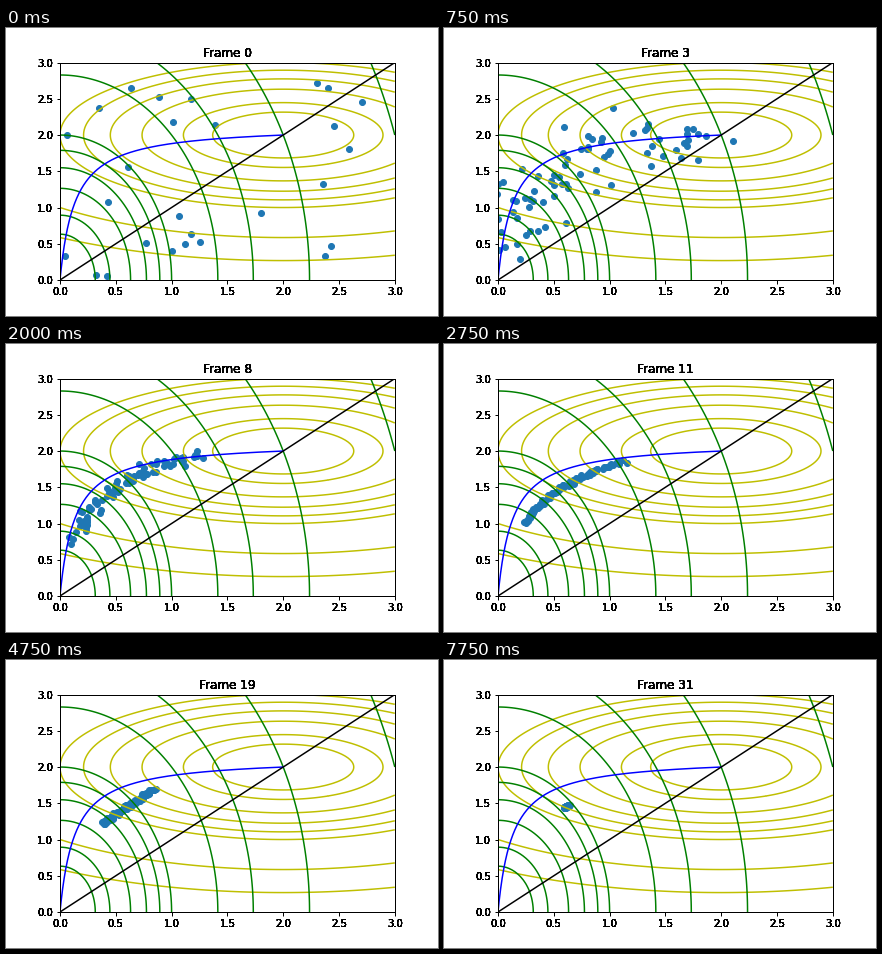
These frames come from a looping animation (432 px wide and 288 px high, 8000 ms). A matplotlib script:

```python
import numpy as np
import matplotlib.pyplot as plt
from matplotlib.animation import FuncAnimation

FRAMES, INTERVAL = 32, 250
SIZE = 80          # individuals in the population
TEXT_LAYERS = 12   # stacked copies give the hard, dark text edges

plt.rcParams.update({"font.family": "DejaVu Sans", "font.size": 10,
                     "axes.linewidth": 1, "xtick.major.width": 1,
                     "ytick.major.width": 1})

# The population scatters around a quadratic Bezier that shrinks with time.
# Each key: generation, scatter, then start, control and end point.
KEYS = np.array([
    (0, 1.8, .10, .30, .20, 1.90, 2.10, 2.00),
    (1, .70, .10, .30, .20, 1.90, 2.10, 2.00),
    (2, .30, .10, .30, .20, 1.90, 2.10, 2.00),
    (5, .07, .11, .55, .22, 1.95, 1.45, 2.00),
    (11, .015, .23, 1.00, .50, 1.60, 1.12, 1.85),
    (19, .015, .38, 1.22, .60, 1.45, .85, 1.70),
    (26, .018, .53, 1.34, .62, 1.47, .70, 1.56),
    (31, .004, .595, 1.44, .61, 1.46, .635, 1.47)])


def population(n):
    rng = np.random.default_rng(n)
    scatter, *arc = [np.interp(n, KEYS[:, 0], col) for col in KEYS[:, 1:].T]
    start, control, end = np.reshape(arc, (3, 2))
    u = np.linspace(0, 1, SIZE)[:, None]
    curve = (1 - u)**2 * start + 2 * u * (1 - u) * control + u**2 * end
    return curve + rng.normal(0, scatter, (SIZE, 2))


fig = plt.figure(figsize=(6, 4), dpi=72, facecolor="white")
ticks = np.arange(0, 3.1, .5)
ax = fig.add_axes([.125, .125, .775, .755], xlim=(0, 3), ylim=(0, 3),
                  xticks=ticks, yticks=ticks)
ax.tick_params(labelbottom=False, labelleft=False)


def label(text, xy, offset, **kw):
    return [ax.annotate(text, xy, offset, xycoords="axes fraction",
                        textcoords="offset points", annotation_clip=False,
                        **kw) for _ in range(TEXT_LAYERS)]


for v in ticks:
    label(f"{v:.1f}", (v / 3, 0), (0, -7), ha="center", va="top")
    label(f"{v:.1f}", (0, v / 3), (-7, 0), ha="right", va="center_baseline")
titles = label("Frame 0", (.5, 1), (0, 6), ha="center", va="baseline",
               fontsize=12)

# Level sets of the two objectives.
X, Y = np.meshgrid(np.linspace(0, 3, 121), np.linspace(0, 3, 121))
levels = [.1, .2, .4, .6, .8, 1, 2, 3, 5, 10]
ax.contour(X, Y, (X - 2)**2 / 4 + (Y - 2)**2, levels[:8], colors="y",
           linewidths=1.5)
ax.contour(X, Y, X**2 + Y**2 / 4, levels, colors="g", linewidths=1.5)

# Pareto set and the diagonal.
t = np.linspace(0, 1, 200)
ax.plot(2 * (1 - t) / (1 + 3 * t), 4 * (1 - t) / (2 - 1.5 * t), "b", lw=1.5)
ax.plot([0, 3], [0, 3], "k", lw=1.5)
dots = ax.scatter(*population(0).T, s=36, c="C0", zorder=1)


def update(n):
    dots.set_offsets(population(n))
    for title in titles:
        title.set_text(f"Frame {n}")
    return [dots, *titles]


anim = FuncAnimation(fig, update, frames=FRAMES, interval=INTERVAL,
                     repeat=True, repeat_delay=0)
plt.show()
```
